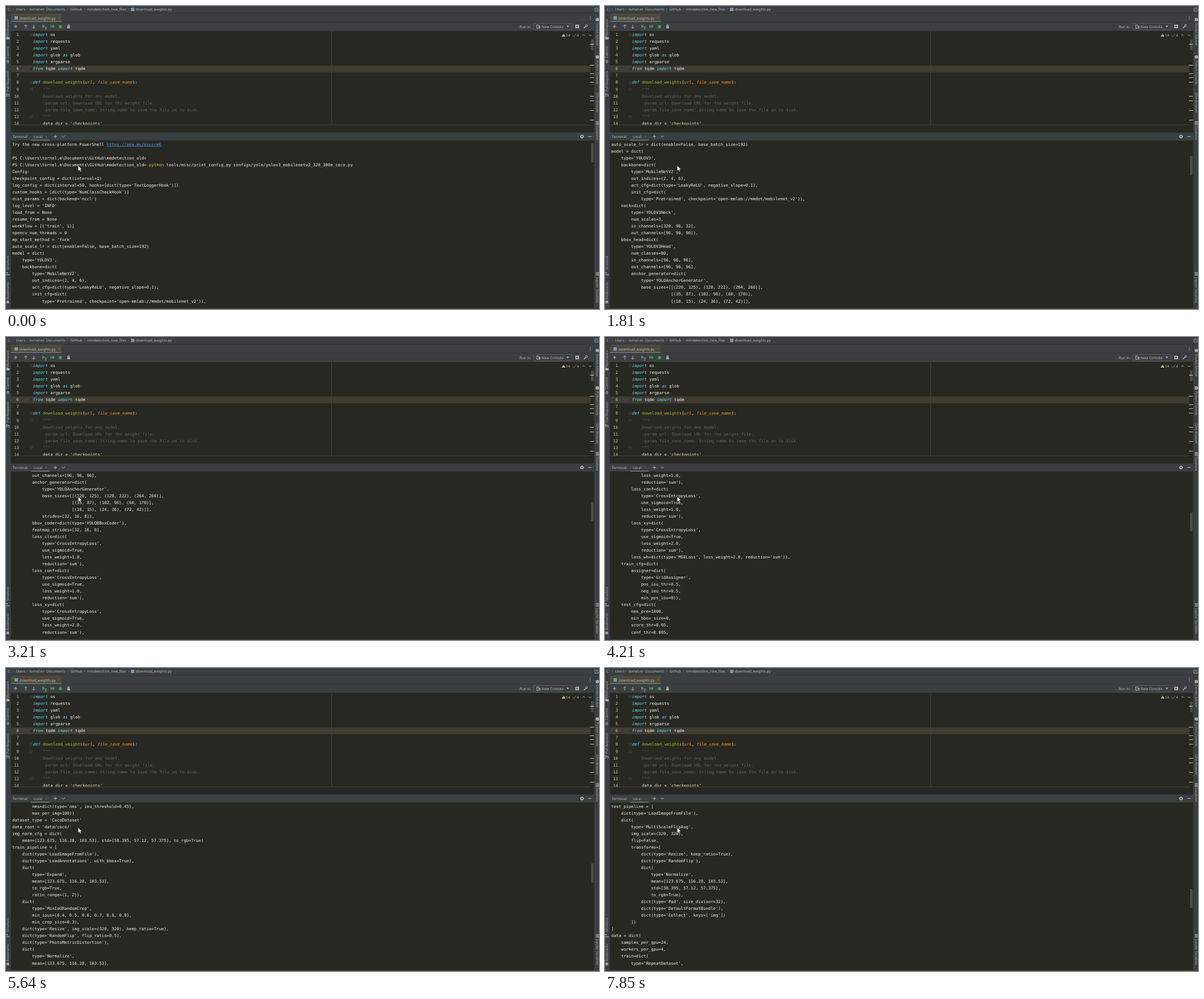
An HTML page for the animation above (8000 ms loop, 1046x535 px).

```html
<!DOCTYPE html>
<html lang="en">
<head>
<meta charset="utf-8">
<title>Config print in terminal</title>
<style>
html, body { margin: 0; width: 100%; height: 100%; overflow: hidden; background: #272822; }
svg { display: block; width: 1046px; height: 535px; }
text { text-rendering: geometricPrecision; white-space: pre; }
.ui { font: 6.25px "Noto Sans", "Open Sans", sans-serif; fill: #bbbcbc; }
.side { font: 5.75px "Noto Sans", "Open Sans", sans-serif; fill: #a9abac; }
.mono { font: 7.29px "DejaVu Sans Mono", "Noto Sans Mono", monospace; fill: #f2f2ec; }
.num { fill: #c8c9c4; text-anchor: end; }
.kw { fill: #66d9ef; font-style: italic; }
.fn { fill: #a6c22e; }
.arg { fill: #fd971f; font-style: italic; }
.doc { fill: #66665c; }
.str { fill: #e9e3b0; }
.cmd { fill: #e5bf3a; }
.link { fill: #4f94de; text-decoration: underline; }
.bar { fill: #3c3f41; }
.line { fill: none; stroke: #b4b6b8; stroke-width: 1; }
.green { fill: #499c54; }
</style>
</head>
<body>
<svg viewBox="0 0 1046 535">
  <defs>
    <clipPath id="codeClip"><rect x="9" y="44" width="1028" height="165.5"/></clipPath>
    <clipPath id="termClip"><rect x="9" y="239" width="1023" height="289"/></clipPath>
  </defs>
  <rect width="1046" height="535" fill="#272822"/>

  <!-- window chrome -->
  <g class="bar">
    <rect width="1046" height="44"/>
    <rect width="8.5" height="535"/>
    <rect x="1037.5" width="8.5" height="535"/>
    <rect x="8" y="223" width="1030" height="14.5"/>
    <rect y="533.4" width="1046" height="1.6"/>
  </g>
  <path d="M0 12.5H1046M9 28.5H1037M9 223.5H1037" stroke="#323537"/>
  <path d="M9 210H1031" stroke="#45463f"/>
  <rect x="9" y="13" width="89" height="15" fill="#4d4a3c"/>
  <rect x="9" y="26.6" width="89" height="1.6" fill="#747a80"/>
  <rect x="44" y="236" width="33" height="1.6" fill="#747a80"/>

  <!-- editor -->
  <rect x="9" y="105" width="1022" height="12" fill="#3e3d32"/>
  <path d="M574.5 44V210" stroke="#43443d"/>
  <g id="folds" fill="#272822" stroke="#4a4b44" stroke-width=".6"></g>
  <g id="code" clip-path="url(#codeClip)"></g>
  <rect x="1032" y="59" width="4.5" height="19" fill="#4d4e48"/>
  <g id="marks" fill="#d0cdb0"></g>
  <path d="M983.5 48.8L986.5 54H980.5Z" fill="#ded6a4"/>
  <path d="M983.5 50.4V52.3M983.5 52.8V53.5" stroke="#3c3a28" stroke-width=".8"/>
  <path d="M999.5 52L1001.7 54L1005.8 49.3" class="line" style="stroke:#59a869"/>
  <path d="M1016.7 52.6L1019 50.3L1021.3 52.6M1028.2 50.5L1030.5 52.8L1032.8 50.5" class="line"/>

  <!-- toolbar icons -->
  <g class="line">
    <path d="M17 33V39M14 36H20M35 39.5V33M32.4 35.7L35 33L37.6 35.7M49 33V39.5M46.4 36.8L49 39.5L51.6 36.8"/>
    <path d="M68.7 37.2H71.8M70.2 37.2V41M68.7 41H71.8" stroke-width=".7"/>
    <path d="M108 34.3H112.6M109 33H111.5"/>
    <path d="M1038.9 3.6H1043M1038.9 3.6V9.2H1044.3V6M1041 7L1045 2.8" stroke-width=".8"/>
  </g>
  <path d="M64 32.5L69 35.7L64 39Z M78.5 32.8L82 36L78.5 39.3Z M82 32.8L86 36L82 39.3Z" class="green"/>
  <ellipse cx="96" cy="36.4" rx="2.3" ry="3" class="green"/>
  <path d="M92.7 34L99.3 39M92.7 39L99.3 34M92.5 36.5H99.5" stroke="#499c54" stroke-width=".8"/>
  <path d="M108.1 35.5H112.6V39.4H108.1Z" fill="#b4b6b8"/>
  <rect x="930.5" y="30.5" width="67.5" height="11.8" rx="1.5" fill="#3c3f41" stroke="#5e6264" stroke-width=".8"/>
  <path d="M940 33.5H936V39.3H942V37M938.3 36.4H943M940.7 34V38.6" class="line" stroke-width=".8"/>
  <path d="M988.5 34.8H993.5L991 37.7Z" fill="#b4b6b8"/>
  <rect x="1004.3" y="33" width="6.5" height="6.3" fill="#b4b6b8"/>
  <path d="M1006.4 34.3L1009.3 36.1L1006.4 38Z" fill="#3c3f41"/>
  <path d="M1019.2 39.3L1023 35.5" class="line" style="stroke-width:1.5"/>
  <circle cx="1024" cy="34.5" r="1.7" class="line"/>
  <g fill="#b4b6b8"><circle cx="1030.5" cy="18.4" r=".7"/><circle cx="1030.5" cy="21" r=".7"/><circle cx="1030.5" cy="23.6" r=".7"/></g>

  <!-- file icons -->
  <rect x="15" y="18" width="6" height="6" fill="#7d9aab"/>
  <rect x="220.5" y="3" width="6" height="6" fill="#7d9aab"/>
  <path d="M92 19.3L95 22.3M95 19.3L92 22.3M69.8 229L72.8 232M72.8 229L69.8 232" stroke="#6f7375" stroke-width=".7"/>

  <!-- terminal header icons -->
  <path d="M87 227.4V233.4M84 230.4H90M98.5 229L101.3 231.8L104.1 229M1026.8 230.4H1033.2" class="line"/>
  <circle cx="1016" cy="230.4" r="2" class="line" style="stroke-width:1.5"/>
  <circle cx="1016" cy="230.4" r="3" class="line" stroke-dasharray="1.2 1.15"/>

  <!-- side strip icons -->
  <path d="M.7 54H3L3.8 55H6.3V59H.7Z M1 525.8V520.2H5.4V525.8L3.2 524Z M.8 470H3V472H.8Z M.8 473.4H3V475.4H.8Z M4 473.4H6.2V475.4H4Z" fill="#a9abac"/>
  <path d="M3.3 95V96.5M3.3 99.6V101.2" class="line"/>
  <circle cx="3.3" cy="98" r="1.7" class="line"/>
  <path d="M1.6 154.5V160M5.4 160V156H3" class="line"/>
  <circle cx="1.6" cy="155" r="1" fill="#a9abac"/>
  <circle cx="1043" cy="24" r="3" fill="#a9abac"/>
  <circle cx="1043" cy="90" r="3" fill="#a9abac"/>
  <path d="M1040.5 203.5H1045.5V205H1040.5Z M1040.5 205.8H1045.5V207.2H1040.5Z M1040.5 208H1045.5V209.4H1040.5Z M1040.3 470H1045.7V471.3H1040.3Z M1040.3 472.2H1045.7V473.5H1040.3Z M1040.3 474.4H1045.7V475.7H1040.3Z" fill="#a9abac"/>

  <g id="labels"></g>
  <g clip-path="url(#termClip)"><g id="term"></g></g>
  <rect id="thumb" x="1032" y="242.5" width="4.5" height="33.5" fill="#4d4e48"/>
  <path d="M127.3 281.8V291.3L129.5 289.3L131 292.6L132.6 291.9L131.1 288.7H134Z" fill="#fff" stroke="#111" stroke-width=".5"/>
</svg>

<script>
const CHAR = 4.389, ROW = 12.04, LOOP = 8000;
const $ = id => document.getElementById(id);
const span = (cls, s) => `<tspan class="${cls}">${s}</tspan>`;
const text = (cls, x, y, s, extra = "") => `<text class="${cls}" x="${x}" y="${y}" ${extra}>${s}</text>`;

// Place a line by its leading spaces.
function monoLine(x, y, line) {
  const body = line.trimStart();
  return text("mono", x + (line.length - body.length) * CHAR, y, body);
}

const imp = rest => span("kw", "import") + " " + rest;
const code = [
  imp("os"), imp("requests"), imp("yaml"),
  imp("glob ") + span("kw", "as") + " glob",
  imp("argparse"),
  span("kw", "from") + " tqdm " + imp("tqdm"),
  "",
  span("kw", "def") + " " + span("fn", "download_weights") + "(" + span("arg", "url") + ", " + span("arg", "file_save_name") + "):",
  ...['"""', "Download weights for any model.", ":param url: Download URL for the weight file.",
    ":param file_save_name: String name to save the file on to disk.", '"""'].map(s => "    " + span("doc", s)),
  "    data_dir = " + span("str", "'checkpoints'")
];
$("code").innerHTML = code.map((s, i) => {
  const y = 53 + i * 12.07;
  return text("mono num", 23, y, i + 1) + monoLine(47.5, y, s);
}).join("");

$("folds").innerHTML = [50.5, 111, 135, 147, 195].map(y =>
  `<rect x="42.5" y="${y - 2}" width="4" height="4"/><path d="M43.5 ${y}H45.5"/>`).join("");
$("marks").innerHTML = [68, 105, 120, 127, 135, 160, 168, 185, 202].map(y =>
  `<rect x="1030" y="${y - 1}" width="7" height="1"/>`).join("");

const ui = [
  [3, 8.3, "C:"], [17.5, 8.3, "Users"], [41.5, 8.3, "tornel.m"], [71, 8.3, "Documents"],
  [113.5, 8.3, "GitHub"], [143, 8.3, "mmdetection_new_files"], [229, 8.3, "download_weights.py"],
  [24, 23.5, "download_weights.py"], [906, 38.5, "Run in:"], [945, 38.5, "New Console"],
  [988, 54, "14"], [1007, 54, "4"], [12, 232.8, "Terminal:"], [49, 232.8, "Local"]
];
const left = [[53, "Workspace"], [92, "Commit"], [151, "Pull Requests"], [466, "Structure"], [518, "Bookmarks"]];
const right = [[30, "Dovlen Adviser"], [96, "Python Console"], [153, "Gfm-Browser"], [211, "Database"], [479, "Jupyter Variables"]];
const turned = (x, y, deg, s) => text("side", 0, 0, s, `transform="translate(${x} ${y}) rotate(${deg})"`);
const chevron = x => `<path d="M${x} 3.6L${x + 2} 6L${x} 8.4" class="line" style="stroke:#777a7c;stroke-width:.7"/>`;
$("labels").innerHTML =
  ui.map(([x, y, s]) => text("ui", x, y, s)).join("") +
  left.map(([y, s]) => turned(5.4, y, -90, s)).join("") +
  right.map(([y, s]) => turned(1040.9, y, 90, s)).join("") +
  [11.5, 36, 65.5, 108, 137.5, 215].map(chevron).join("");

const prompt = "PS C:\\Users\\tornel.m\\Documents\\GitHub\\mmdetection_old&gt;";
const loss = (name, weight) => `        loss_${name}=dict(
            type='CrossEntropyLoss',
            use_sigmoid=True,
            loss_weight=${weight},
            reduction='sum'),`;
const output = `Try the new cross-platform PowerShell ${span("link", "https://aka.ms/pscore6")}

${prompt}
${prompt} ${span("cmd", "python")} tools/misc/print_config.py configs/yolo/yolov3_mobilenetv2_320_300e_coco.py
Config:
checkpoint_config = dict(interval=1)
log_config = dict(interval=50, hooks=[dict(type='TextLoggerHook')])
custom_hooks = [dict(type='NumClassCheckHook')]
dist_params = dict(backend='nccl')
log_level = 'INFO'
load_from = None
resume_from = None
workflow = [('train', 1)]
opencv_num_threads = 0
mp_start_method = 'fork'
auto_scale_lr = dict(enable=False, base_batch_size=192)
model = dict(
    type='YOLOV3',
    backbone=dict(
        type='MobileNetV2',
        out_indices=(2, 4, 6),
        act_cfg=dict(type='LeakyReLU', negative_slope=0.1),
        init_cfg=dict(
            type='Pretrained', checkpoint='open-mmlab://mmdet/mobilenet_v2')),
    neck=dict(
        type='YOLOV3Neck',
        num_scales=3,
        in_channels=[320, 96, 32],
        out_channels=[96, 96, 96]),
    bbox_head=dict(
        type='YOLOV3Head',
        num_classes=80,
        in_channels=[96, 96, 96],
        out_channels=[96, 96, 96],
        anchor_generator=dict(
            type='YOLOAnchorGenerator',
            base_sizes=[[(220, 125), (128, 222), (264, 266)],
                        [(35, 87), (102, 96), (60, 170)],
                        [(10, 15), (24, 36), (72, 42)]],
            strides=[32, 16, 8]),
        bbox_coder=dict(type='YOLOBBoxCoder'),
        featmap_strides=[32, 16, 8],
${loss("cls", "1.0")}
${loss("conf", "1.0")}
${loss("xy", "2.0")}
        loss_wh=dict(type='MSELoss', loss_weight=2.0, reduction='sum')),
    train_cfg=dict(
        assigner=dict(
            type='GridAssigner',
            pos_iou_thr=0.5,
            neg_iou_thr=0.5,
            min_pos_iou=0)),
    test_cfg=dict(
        nms_pre=1000,
        min_bbox_size=0,
        score_thr=0.05,
        conf_thr=0.005,
        nms=dict(type='nms', iou_threshold=0.45),
        max_per_img=100))
dataset_type = 'CocoDataset'
data_root = 'data/coco/'
img_norm_cfg = dict(
    mean=[123.675, 116.28, 103.53], std=[58.395, 57.12, 57.375], to_rgb=True)
train_pipeline = [
    dict(type='LoadImageFromFile'),
    dict(type='LoadAnnotations', with_bbox=True),
    dict(
        type='Expand',
        mean=[123.675, 116.28, 103.53],
        to_rgb=True,
        ratio_range=(1, 2)),
    dict(
        type='MinIoURandomCrop',
        min_ious=(0.4, 0.5, 0.6, 0.7, 0.8, 0.9),
        min_crop_size=0.3),
    dict(type='Resize', img_scale=(320, 320), keep_ratio=True),
    dict(type='RandomFlip', flip_ratio=0.5),
    dict(type='PhotoMetricDistortion'),
    dict(
        type='Normalize',
        mean=[123.675, 116.28, 103.53],
        std=[58.395, 57.12, 57.375],
        to_rgb=True),
    dict(type='Pad', size_divisor=32),
    dict(type='DefaultFormatBundle'),
    dict(type='Collect', keys=['img', 'gt_bboxes', 'gt_labels'])
]
test_pipeline = [
    dict(type='LoadImageFromFile'),
    dict(
        type='MultiScaleFlipAug',
        img_scale=(320, 320),
        flip=False,
        transforms=[
            dict(type='Resize', keep_ratio=True),
            dict(type='RandomFlip'),
            dict(
                type='Normalize',
                mean=[123.675, 116.28, 103.53],
                std=[58.395, 57.12, 57.375],
                to_rgb=True),
            dict(type='Pad', size_divisor=32),
            dict(type='DefaultFormatBundle'),
            dict(type='Collect', keys=['img'])
        ])
]
data = dict(
    samples_per_gpu=24,
    workers_per_gpu=4,
    train=dict(
        type='RepeatDataset',`;
$("term").innerHTML = output.split("\n").map((s, i) => monoLine(11, 246.6 + i * ROW, s)).join("");

// [time in ms, first visible line]
const steps = [
  [0, 0], [600, 3], [1020, 6], [1410, 12], [1810, 15],
  [2410, 18], [2610, 24], [3010, 30], [3210, 33], [3410, 36], [3610, 42],
  [4210, 45], [4410, 48], [4630, 54], [5030, 57], [5230, 60], [5430, 66], [5640, 69],
  [6230, 72], [6430, 75], [6630, 81], [6830, 84],
  [7450, 87], [7650, 93], [7850, 99]
];
const start = performance.now();
function draw(now) {
  const t = Math.max(0, now - start) % LOOP;
  const top = steps.findLast(([at]) => at <= t)[1];
  $("term").setAttribute("transform", `translate(0 ${-top * ROW})`);
  $("thumb").setAttribute("y", 242.5 + top * 1.49);
  requestAnimationFrame(draw);
}
draw(start);
</script>
</body>
</html>
```
